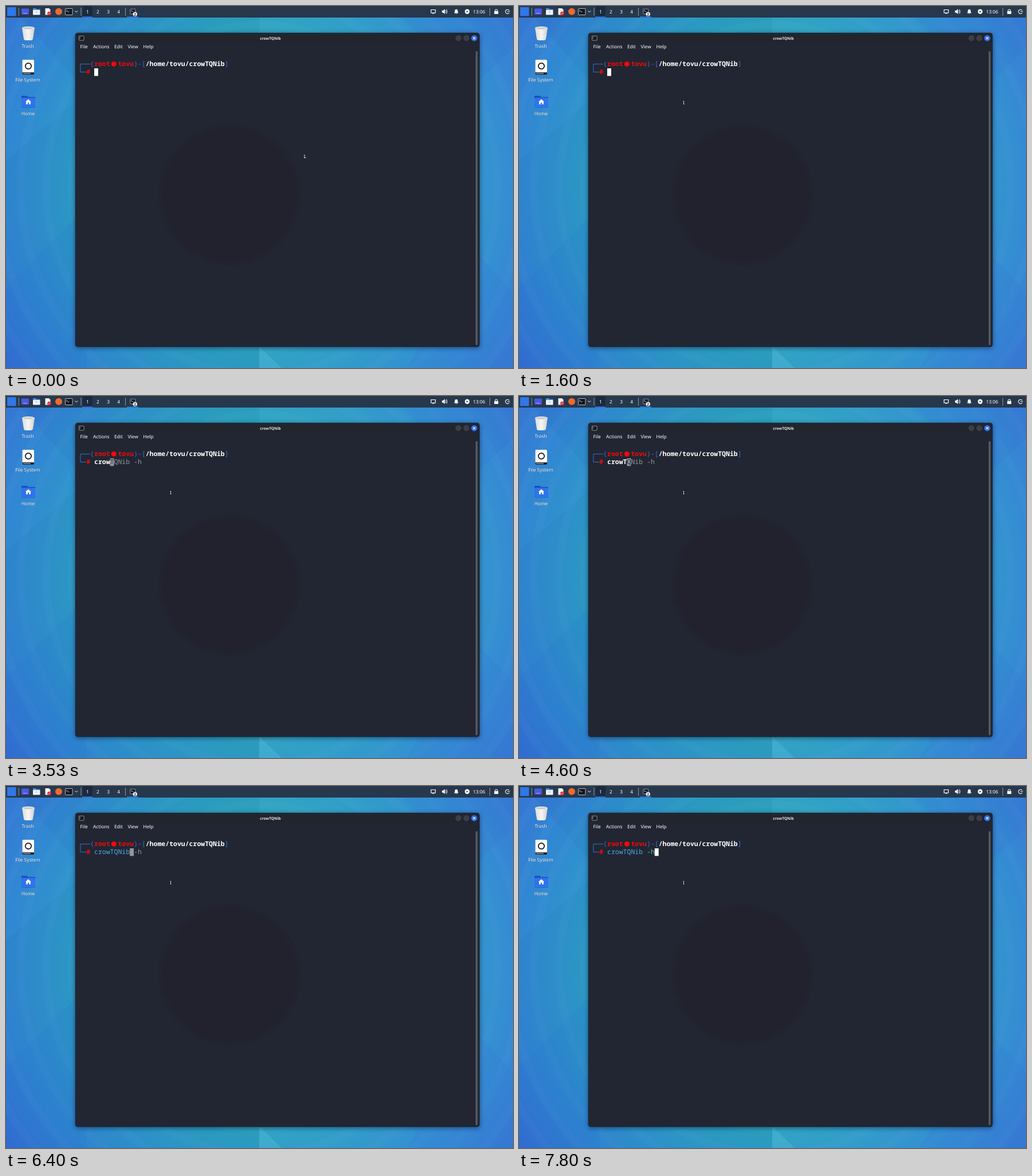
An HTML page that plays this animation: 885x633 px, repeating every 8 s.

```html
<!DOCTYPE html>
<html lang="en">
<head>
<meta charset="utf-8">
<title>Terminal session</title>
<style>
  html, body { margin: 0; width: 100%; height: 100%; overflow: hidden; background: #2d8fc9; }
  svg { display: block; width: 100vw; height: 100vh; }
  text { font: 8.3px "Noto Sans", sans-serif; fill: #fff; white-space: pre; text-rendering: geometricPrecision; }
  .mid { text-anchor: middle; }
  .title { font-size: 6.6px; font-weight: 700; fill: #e8e9eb; }
  .term text { font: 11.5px "Noto Sans Mono", monospace; }
  .label { filter: drop-shadow(.5px .8px .7px #0009); }
  .line { fill: none; stroke: #fff; stroke-linecap: round; }
</style>
</head>
<body>
<svg viewBox="0 0 885 633" preserveAspectRatio="none">
  <defs>
    <radialGradient id="sky" gradientUnits="userSpaceOnUse" cx="442" cy="316" r="545">
      <stop offset="0" stop-color="#2ca4b6"/>
      <stop offset=".5" stop-color="#2a9fba"/>
      <stop offset=".62" stop-color="#2c95c5"/>
      <stop offset=".82" stop-color="#2f82cf"/>
      <stop offset="1" stop-color="#336cd0"/>
    </radialGradient>
    <linearGradient id="cup" x2="1" y2="0">
      <stop offset="0" stop-color="#dcdcdc"/>
      <stop offset=".5" stop-color="#f6f6f6"/>
      <stop offset="1" stop-color="#cfcfcf"/>
    </linearGradient>
    <linearGradient id="screen" x2="1" y2="1">
      <stop offset="0" stop-color="#2f6bea"/>
      <stop offset="1" stop-color="#6a45d8"/>
    </linearGradient>
    <filter id="shade" x="-5%" y="-5%" width="110%" height="112%">
      <feDropShadow dx="0" dy="2" stdDeviation="4" flood-color="#04192e" flood-opacity=".5"/>
    </filter>
    <filter id="soft"><feGaussianBlur stdDeviation="2"/></filter>
  </defs>

  <!-- wallpaper -->
  <rect width="885" height="633" fill="url(#sky)"/>
  <g id="rings" fill="none" stroke="#fff" stroke-opacity=".018" stroke-width="14"></g>
  <path d="M442 0H885V633H442Z" fill="#5fc4f0" opacity=".13"/>
  <path d="M0 20H26L140 150L0 270Z" fill="#47b4ee" opacity=".1"/>
  <path d="M0 492L140 352V633H0Z" fill="#2360c8" opacity=".08"/>
  <path d="M442 595L481 633H442Z" fill="#7ad6e8" opacity=".2"/>
  <path d="M690 20H885V75L815 140Z" fill="#2a66cf" opacity=".12"/>
  <path d="M815 425L885 500V633H700Z" fill="#2a66cf" opacity=".1"/>

  <!-- desktop icons -->
  <g class="label">
    <path d="M28 39L31 58Q31.500 60 34 60H44Q46.500 60 47 58L50 39Z" fill="url(#cup)"/>
    <ellipse cx="39" cy="38.500" rx="11" ry="2.800" fill="#f4f4f4"/>
    <ellipse cx="39" cy="38.800" rx="9.500" ry="1.800" fill="#c9c9c9"/>
    <rect x="28.500" y="94" width="20.500" height="26" rx="1.500" fill="#fff"/>
    <path d="M28.500 116H49V118.500Q49 120 47.500 120H30Q28.500 120 28.500 118.500Z" fill="#20242c"/>
    <path d="M30 118H43" stroke="#cfd3d8"/>
    <circle cx="39" cy="105" r="5.200" fill="#fff" stroke="#111" stroke-width="1.700"/>
    <path d="M27 158.500Q27 157 28.500 157H36L38 159H51V162H27Z" fill="#1d4fb8"/>
    <rect x="27" y="160.500" width="24" height="17" rx="1.500" fill="#2f74ec"/>
    <path d="M39 163L44 167.500H42.800V172H40.200V169H37.800V172H35.200V167.500H34Z" fill="#fff"/>
    <text class="mid" x="38" y="73.300">Trash</text>
    <text class="mid" x="38" y="132.300">File System</text>
    <text class="mid" x="38.500" y="191.300">Home</text>
  </g>

  <!-- top panel -->
  <rect width="885" height="20" fill="#27384c"/>
  <path d="M0 19.700H885" stroke="#1d2b3d" stroke-width=".6"/>
  <rect x="134" width="17" height="20" fill="#1c2a40"/>
  <path d="M133 19.200H151M211 19.200H231" stroke="#2f74ec" stroke-width="1.600"/>
  <path d="M22.300 3V17M131 3V17M208.500 3V17M844.500 3V17" stroke="#8d97a4"/>
  <rect x="2" y="2" width="15.500" height="15.500" fill="#2f78e8"/>
  <rect x="27" y="4.500" width="13" height="10.500" rx="1" fill="url(#screen)"/>
  <path d="M30 12.700H37" stroke="#b9c6ff" stroke-width=".8"/>
  <path d="M47 5Q47 4 48 4H52L53.500 5.500H59.500V8H47Z" fill="#4a90ee"/>
  <rect x="47" y="7" width="12.500" height="8.500" rx=".8" fill="#edf3fb"/>
  <path d="M51.500 10.500H55" stroke="#9db0c8"/>
  <path d="M68.500 4H75L77.500 6.500V15.500H68.500Z" fill="#f5f5f5"/>
  <circle cx="75.500" cy="13" r="3.300" fill="#e02a35"/>
  <path d="M74 14.500L77 11.500" stroke="#fff" stroke-width=".9"/>
  <circle cx="92" cy="9.700" r="6" fill="#ef6a2e"/>
  <rect x="103.500" y="4.500" width="12.500" height="11" rx=".8" fill="#12161d" stroke="#c6cbd2" stroke-width=".9"/>
  <path class="line" d="M105.500 7L107 8.300L105.500 9.600M108 10H110" stroke-width=".8"/>
  <path class="line" d="M120.700 8.700L122.800 10.800L124.900 8.700"/>
  <g id="spaces"></g>
  <rect x="216.800" y="5.300" width="9" height="8.500" rx=".6" fill="#12161d" stroke="#aab1ba" stroke-width=".8"/>
  <path class="line" d="M218.300 7.200L219.500 8.200L218.300 9.200M220.300 9.500H222" stroke-width=".7"/>
  <circle cx="225.200" cy="14.300" r="3.700" fill="#f4f5f7"/>
  <text class="mid" x="225.200" y="16.700" style="font-size:6.500px;font-weight:700;fill:#1a2230">2</text>

  <path class="line" d="M742 6.500H749.500V12H742ZM744.500 13H747" stroke-width="1.200"/>
  <path d="M761 8H763L766 5.300V14L763 11.500H761Z" fill="#fff"/>
  <path class="line" d="M767.500 7.500Q769 9.700 767.500 11.900M769 6Q771.600 9.700 769 13.400" stroke-width=".9"/>
  <path d="M782.200 12.500Q783.500 11.500 783.500 8.800Q783.500 6 786 5.800Q788.500 6 788.500 8.800Q788.500 11.500 789.800 12.500ZM785 13.200H787L786 14.200Z" fill="#fff"/>
  <circle cx="805" cy="9.800" r="4.200" fill="#fff"/>
  <path d="M803.900 8L806.800 9.800L803.900 11.600Z" fill="#27384c"/>
  <text x="815.300" y="12.700">13:06</text>
  <rect x="852.300" y="9" width="7" height="5" rx=".6" fill="#fff"/>
  <path class="line" d="M853.800 9V7.800Q853.800 6 855.800 6T857.800 7.800V9" stroke-width="1.100"/>
  <path class="line" d="M878 7.300A3.600 3.600 0 1 0 878 12.300M875.500 9.800H879.300" stroke-width="1.100"/>

  <!-- window -->
  <rect x="121.300" y="47.300" width="705" height="548.500" rx="4" fill="#242831" stroke="#171a21" stroke-width=".8" filter="url(#shade)"/>
  <path d="M121.700 64V51Q121.700 47.700 125 47.700H822.500Q826 47.700 826 51V64Z" fill="#22252e"/>
  <circle cx="390" cy="330" r="120" fill="#21242e" filter="url(#soft)"/>
  <rect x="127.500" y="52.500" width="8.500" height="7.500" rx=".6" fill="#12161d" stroke="#aab1ba" stroke-width=".8"/>
  <path class="line" d="M129 54.500L130.200 55.500L129 56.500" stroke-width=".7"/>
  <text class="mid title" id="title" x="461.500" y="58.600"></text>
  <g fill="#3a3e48" stroke="#4a4e58" stroke-width=".6">
    <circle cx="789.700" cy="56.300" r="4.700"/>
    <circle cx="803.500" cy="56.300" r="4.700"/>
  </g>
  <circle cx="817.300" cy="56.300" r="5.300" fill="#2f6fee"/>
  <path d="M815.300 54.300L819.300 58.300M819.300 54.300L815.300 58.300" stroke="#fff" stroke-width="1.100"/>
  <g id="menu"></g>
  <rect x="819.800" y="79" width="3.400" height="514" rx="1.500" fill="#575a60"/>

  <!-- terminal text -->
  <g class="term">
    <path d="M147.100 101.500H129.900V115.500H140.200" fill="none" stroke="#2f72d8"/>
    <text id="prompt" y="105.200"></text>
    <circle cx="188.300" cy="101.400" r="4.500" fill="#f00a0a"/>
    <text x="140.200" y="119.200" style="font-weight:700;fill:#f00a0a">#</text>
    <rect id="caret" y="109" width="6.900" height="13.300"/>
    <text id="command" x="154" y="119.200"></text>
  </g>

  <g id="mouse">
    <path d="M-1.300 -2.500H1.300M0 -2.500V2.500M-1.300 2.500H1.300" stroke="#101218" stroke-width="2" fill="none"/>
    <path d="M-1 -2.500H.600M0 -2.500V2.500M-1 2.500H1" stroke="#f2f2f2" stroke-width=".9" fill="none"/>
    <path id="tick" d="M1.300 .500V2.500H2.800" stroke="#b9bcc2" stroke-width=".7" fill="none"/>
  </g>
</svg>
<script>
const LOOP = 8000, CELL = 6.9, LEFT = 154;
const HOST = 'tovu', TOOL = 'crowTQNib', LINE = TOOL + ' -h';
const WHITE = '#fff', GREY = '#94979c', BLUE = '#2f72d8', RED = '#f00a0a',
      CYAN = '#49aee6', GREEN = '#5ebdab', DARK = '#242831';
const KEYS = [3000, 3200, 3400, 3530, 4530, 4800, 5870, 6130, 6400, 6670, 7130, 7530];

const $ = id => document.getElementById(id);
const span = (text, fill, bold, x) =>
  `<tspan${x ? ` x="${x}"` : ''} style="fill:${fill};font-weight:${bold ? 700 : 400}">${text}</tspan>`;

function buildStatic() {
  $('title').textContent = TOOL;
  $('menu').innerHTML = [['File', 129.5], ['Actions', 152], ['Edit', 189], ['View', 212.5], ['Help', 239.5]]
    .map(([name, x]) => `<text x="${x}" y="74.300">${name}</text>`).join('');
  $('spaces').innerHTML = [142.3, 160.3, 178.6, 196.7]
    .map((x, i) => `<text class="mid" x="${x}" y="12.700">${i + 1}</text>`).join('');
  $('rings').innerHTML = Array.from({ length: 7 }, (_, i) =>
    `<circle cx="442" cy="316" r="${240 + i * 44}"/>`).join('');
  const at = col => LEFT + col * CELL;
  $('prompt').innerHTML = span('(', BLUE, false, at(-1)) + span('root', RED, true, at(0)) +
    span(HOST, RED, true, at(6)) + span(')-[', BLUE, false, at(10)) +
    span(`/home/${HOST}/${TOOL}`, WHITE, true, at(13)) + span(']', BLUE, false, at(33));
}

function drawCommand(count) {
  const known = count >= TOOL.length;
  const typed = LINE.slice(0, count);
  const hint = count ? LINE.slice(count) : '';
  $('command').innerHTML =
    span(typed.slice(0, TOOL.length), known ? CYAN : WHITE, !known) +
    span(typed.slice(TOOL.length), count === LINE.length ? GREEN : WHITE) +
    span(hint.slice(0, 1), DARK) + span(hint.slice(1), GREY);
  $('caret').setAttribute('x', LEFT + count * CELL);
  $('caret').setAttribute('fill', hint ? GREY : WHITE);
}

function drawMouse(t) {
  const step = t < 200 ? 0 : Math.min(10, Math.floor((t - 200) / 66.6) + 1);
  const p = step / 10, ease = p * p * (3 - 2 * p);
  $('mouse').setAttribute('transform', `translate(${521 - 233.5 * ease} ${263 - 94 * ease})`);
  $('tick').setAttribute('visibility', step ? 'hidden' : 'visible');
}

let shown = -1;
function draw(t) {
  const count = KEYS.filter(k => t >= k).length;
  if (count !== shown) drawCommand(shown = count);
  drawMouse(t);
}

function tick() {
  draw(performance.now() % LOOP);
  requestAnimationFrame(tick);
}

buildStatic();
tick();
</script>
</body>
</html>
```
